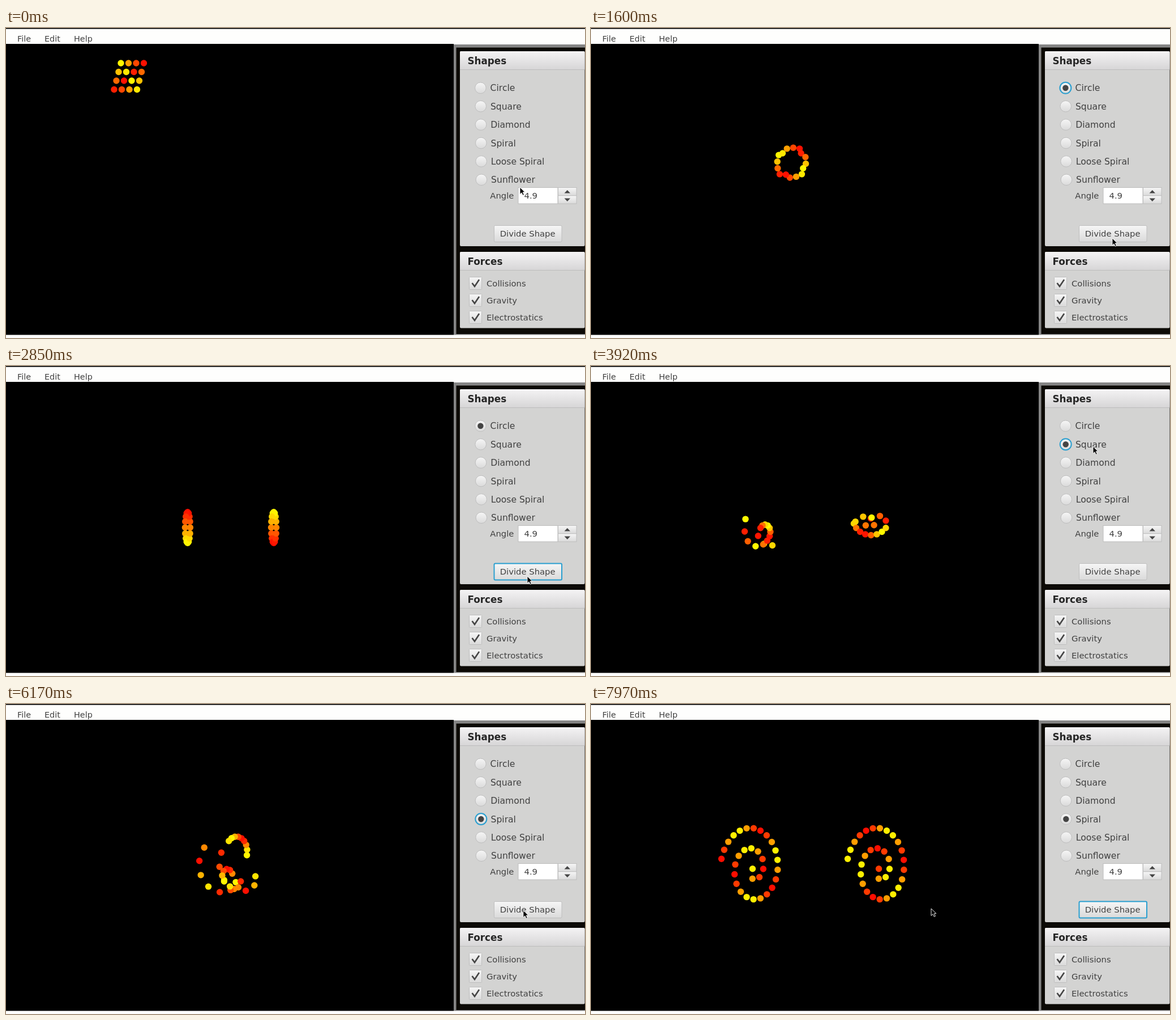
Animation, 1023 px wide and 547 px high, one loop 7990 ms. Source, as an HTML page:

```html
<!DOCTYPE html>
<html lang="en">
<head>
<meta charset="utf-8">
<title>Particle shapes</title>
<style>
  html, body { margin: 0; width: 100%; height: 100%; overflow: hidden; background: #fff; }
  svg { display: block; width: 100vw; height: 100vh; }
  text { font: 15.6px "DejaVu Sans", sans-serif; fill: #404040; }
  .menu { font-size: 14.4px; }
  .small { font-size: 14.8px; }
  .title { font-size: 16.8px; font-weight: bold; fill: #262626; }
  .control { fill: url(#face); stroke: #bebebe; }
  .focus { fill: none; stroke: #2a9fd0; stroke-width: 2; }
</style>
</head>
<body>
<svg id="stage" viewBox="0 0 1023 547" preserveAspectRatio="none">
  <defs>
    <linearGradient id="face" x2="0" y2="1">
      <stop stop-color="#f6f6f6"/><stop offset="1" stop-color="#dadada"/>
    </linearGradient>
    <linearGradient id="head" x2="0" y2="1">
      <stop stop-color="#f4f3f4"/><stop offset="1" stop-color="#d6d5d6"/>
    </linearGradient>
  </defs>
  <rect width="1023" height="547" fill="#fefefd"/>
  <rect width="1023" height="1.6"/>
  <rect y="28" width="791" height="513.5"/>
  <rect x="791" y="29" width="232" height="512.5" fill="#858585"/>
  <rect x="795.5" y="34.5" width="228" height="505.5" fill="#0c0a06"/>
  <g id="panel"></g>
  <g id="dots"></g>
  <path id="cursor" d="M0 0V12.5L3 9.7L5.2 14.3L7.4 13.3L5.2 8.8H9Z" stroke="#fff" stroke-width="0.9"/>
</svg>
<script>
const LOOP = 7990, TAU = 2 * Math.PI, COUNT = 32;
const CX = 397, SPREAD = 130.5;
const byId = id => document.getElementById(id);

function add(parent, tag, attrs, text) {
  const node = document.createElementNS("http://www.w3.org/2000/svg", tag);
  for (const key in attrs) node.setAttribute(key, attrs[key]);
  if (text) node.textContent = text;
  parent.appendChild(node);
  return node;
}

// Interface
const panel = byId("panel");
const label = (x, y, text, cls = "") => add(panel, "text", { x, y, class: cls }, text);
const box = (x, y, width, height, attrs) => add(panel, "rect", { x, y, width, height, ...attrs });

[["File", 20], ["Edit", 68], ["Help", 120]].forEach(([name, x]) => label(x, 24, name, "menu"));
[["Shapes", 41, 385], ["Forces", 395, 529.5]].forEach(([name, top, bottom]) => {
  box(802, top, 220.5, bottom - top, { fill: "#d3d3d2", rx: 2 });
  box(802, top, 220.5, 33, { fill: "url(#head)", rx: 2 });
  box(802, top + 32, 220.5, 1, { fill: "#bdbdbd" });
  label(815.5, top + 23, name, "title");
});

const radios = ["Circle", "Square", "Diamond", "Spiral", "Loose Spiral", "Sunflower"].map((name, i) => {
  const cx = 838.4 + i * 0.3, cy = 105.8 + i * 32.4;
  add(panel, "circle", { cx, cy, r: 9.8, class: "control" });
  label(cx + 17.2, cy + 5.6, name);
  return {
    mark: add(panel, "circle", { cx, cy, r: 5.2, fill: "#444" }),
    ring: add(panel, "circle", { cx, cy, r: 10, class: "focus" })
  };
});

label(855.3, 300.5, "Angle", "small");
box(905, 281.5, 70, 28.5, { fill: "#fff", stroke: "#bbb" });
box(975.5, 281.5, 32.5, 14.2, { class: "control" });
box(975.5, 295.8, 32.5, 14.2, { class: "control" });
add(panel, "path", { d: "M986.5 291.5h10.5l-5.2-5.5zM986.5 300.5h10.5l-5.2 5.5z", fill: "#444" });
label(915.5, 301, "4.9", "small");
box(862.5, 348.5, 119.5, 29, { class: "control", rx: 2 });
const buttonRing = box(862.5, 348.5, 119.5, 29, { class: "focus", rx: 2 });
label(872.7, 368, "Divide Shape", "small");

["Collisions", "Gravity", "Electrostatics"].forEach((name, i) => {
  const y = 439.5 + i * 30;
  box(818.5, y, 22, 22, { class: "control", rx: 1 });
  add(panel, "path", { d: `M823.5 ${y + 10.5}l4.5 6l8-12`, fill: "none", stroke: "#444", "stroke-width": 2.6 });
  label(849, y + 16.2, name, "small");
});

// Layouts
const lerp = (a, b, p) => a + (b - a) * p;
const mix = (a, b, p) => [lerp(a[0], b[0], p), lerp(a[1], b[1], p)];
const ramp = (t, from, to) => Math.min(1, Math.max(0, (t - from) / (to - from)));
const list = (n, fn) => Array.from({ length: n }, (_, i) => fn(i));

// A slanted grid, ordered by angle so that it opens into the ring
const turn = ([x, y]) => (Math.atan2(y - 85, x - 217) + TAU) % TAU;
const blob = list(16, i => {
  const row = Math.floor(i / 4), col = i % 4;
  return [203 + 13.5 * col - 4 * row, 62 + 15.5 * row];
}).sort((a, b) => turn(a) - turn(b));

const ring = i => [CX + 27.3 * Math.cos(TAU * i / 16), 285 + 27.3 * Math.sin(TAU * i / 16)];

// Top row, then both sides row by row, then the bottom row
function square(j) {
  const at = (col, row) => [352 + 11.2 * col, 256.8 + 11.2 * row];
  if (j < 9) return at(j, 0);
  if (j > 22) return at(j - 23, 8);
  return at(j % 2 ? 0 : 8, Math.floor((j - 7) / 2));
}

// From the outer tail inwards
function spiral(j) {
  const k = COUNT - 1 - j;
  const r = k ? Math.sqrt(200 * k + 110) : 0;
  const a = (10 * r - 267) * Math.PI / 180;
  return [CX - r * Math.cos(a), 290.7 - r * Math.sin(a)];
}

// Each copy slides outwards while mirroring itself
const divided = ([x, y], side, e) => [CX + side * SPREAD * e + (1 - 2 * e) * (x - CX), y];

const wave = (j, red, period = 7) => 31 - 28 * Math.cos(TAU * (j - red) / period);

function rings(n, e) {
  return divided(ring(n % 16), n < 16 ? 1 : -1, e);
}

function particles(t) {
  if (t < 2190) return list(16, i =>
    [...mix(blob[i], ring(i), ramp(t, 800, 1850)), wave(i, 13.3, 8)]);
  if (t < 3640) return list(COUNT, n =>
    [...rings(n, 0.97 * ramp(t, 2190, 3290)), wave(n, n < 16 ? 4 : 12, 16)]);
  if (t < 5570) return list(COUNT, j =>
    [...mix(rings((j + 31) % COUNT, 0.97), square(j), ramp(t, 3640, 4767)), wave(j, 3.6)]);
  if (t < 6848) return list(COUNT, j =>
    [...mix(square(j), spiral(j), ramp(t, 5570, 6570)), wave(j, 3.8)]);
  return list(2 * COUNT, n => {
    const j = n % COUNT, left = n < COUNT;
    return [...divided(spiral(j), left ? -1 : 1, (t - 6848) / 1314), wave(j, left ? 7 : 4)];
  });
}

// Pointer stops: arrival, departure, place
const stops = [
  [0, 0, 908, 281], [500, 900, 886, 106], [1500, 2900, 921, 371], [3320, 4900, 887, 142],
  [5300, 5600, 888, 203], [6250, 7450, 915, 371], [7970, LOOP, 601, 361]
];
function pointerAt(t) {
  const n = stops.findIndex(stop => t < stop[1]);
  const [arrive, , ...place] = stops[n], [, leave, ...from] = stops[n - 1];
  const p = ramp(t, leave, arrive);
  return mix(from, place, p * p * (3 - 2 * p));
}

const dots = list(2 * COUNT, () => add(byId("dots"), "circle", { r: 5.7 }));
const show = (node, on) => node.setAttribute("visibility", on ? "visible" : "hidden");

function draw(t) {
  const live = particles(t);
  dots.forEach((dot, i) => {
    show(dot, i < live.length);
    if (i >= live.length) return;
    const [x, y, hue] = live[i];
    dot.setAttribute("cx", x);
    dot.setAttribute("cy", y);
    dot.setAttribute("fill", `hsl(${hue}, 100%, 50%)`);
  });

  const chosen = t < 790 ? -1 : t < 3640 ? 0 : t < 5560 ? 1 : 3;
  const dividing = (t >= 2180 && t < 3640) || t >= 6840;
  radios.forEach((radio, i) => {
    show(radio.mark, i === chosen);
    show(radio.ring, i === chosen && !dividing);
  });
  show(buttonRing, dividing);
  byId("cursor").setAttribute("transform", `translate(${pointerAt(t)})`);
}

const began = performance.now();
function tick() {
  draw((performance.now() - began) % LOOP);
  requestAnimationFrame(tick);
}
tick();
</script>
</body>
</html>
```
